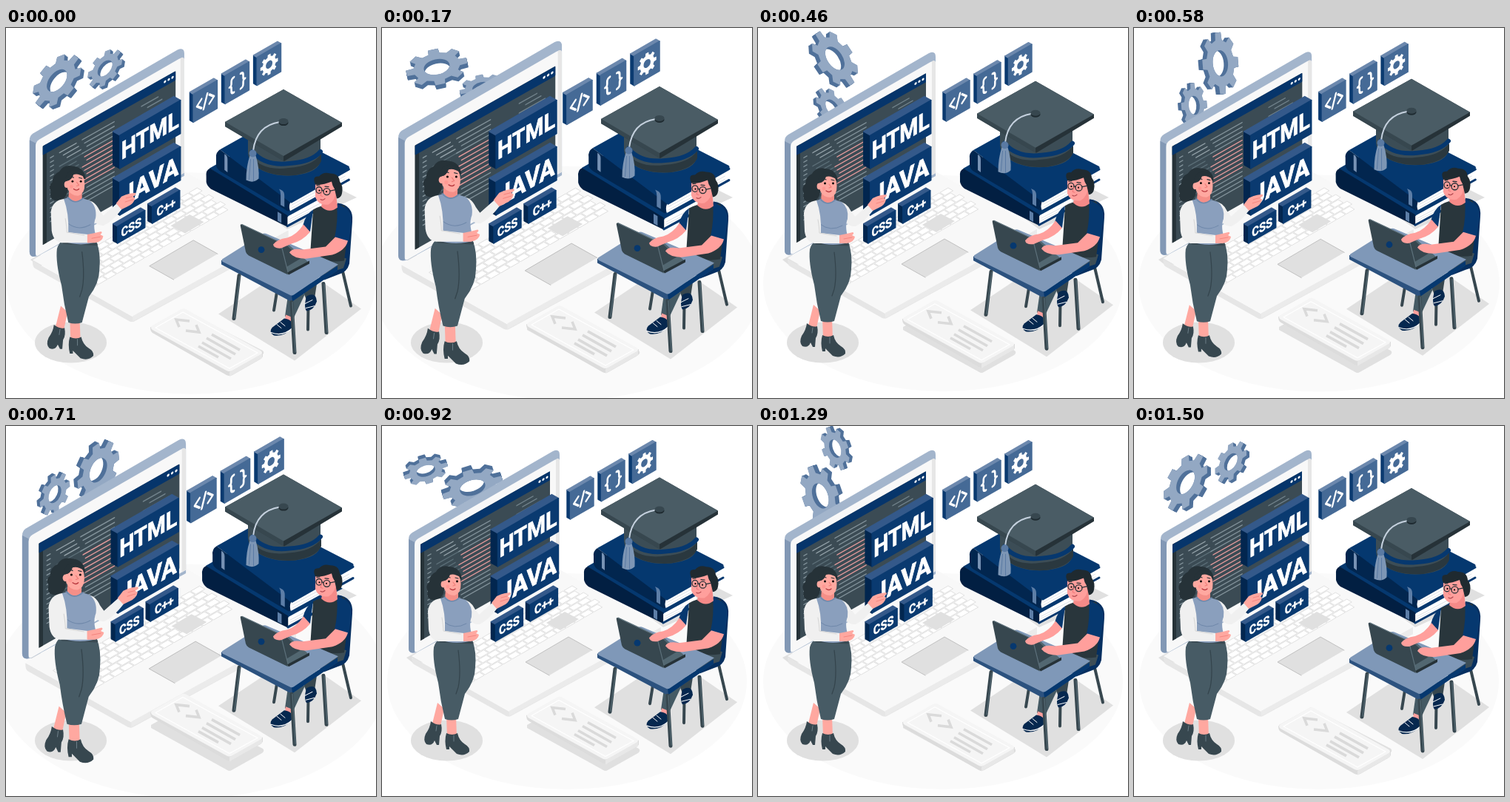
These frames come from a looping animation (500 by 500 pixels, 1.54 s). An HTML page:

```html
<!DOCTYPE html>
<html lang="en">
<head>
<meta charset="utf-8">
<title>Learning to code</title>
<style>
html, body { margin: 0; width: 100%; height: 100%; overflow: hidden; background: #fff; }
svg { display: block; width: 100vw; height: 100vh; }
text { font-family: Roboto, Inter, sans-serif; font-weight: 700; fill: #fff; text-anchor: middle; }
.line { fill: none; stroke-linecap: round; stroke-linejoin: round; }
</style>
</head>
<body>
<svg viewBox="0 0 500 500" xmlns="http://www.w3.org/2000/svg">
  <ellipse id="ground" cx="250" cy="345" rx="243" ry="146" fill="#fafafa"/>
  <g fill="#e0e0e0">
    <ellipse cx="87.5" cy="425" rx="48.5" ry="27.5"/>
    <path d="M196 404L239 380 347 436Q350 439 346 442L305 465Q302 467 299 465L196 408Z"/>
    <path d="M380 272L474 229 440 212 350 250Z"/>
    <path d="M33 313L46 306 60 318 44 322Z"/>
  </g>
  <g id="gears"></g>

  <g id="laptop">
    <path d="M40 312L172 386 377 272V281L174 392Q172 393 168 392L43 322Q40 320 40 313Z" fill="#e6e6e6"/>
    <path d="M40 311L240 194 377 272 174 384Q172 385 169 384Z" fill="#f8f8f8"/>
    <path d="M172 385V392L377 281V272Z" fill="#ebebeb"/>
    <g id="keys" fill="#fff" stroke="#dedede" stroke-width=".9"></g>
    <path d="M222 266L247 251 266 261 241 276Z" fill="#e0e0e0"/>
    <path d="M252 285L194 319 226 337 284 303Z" fill="#e0e0e0"/>
    <path d="M226 337L194 319 252 285 284 303" class="line" stroke="#bdbdbd" stroke-width=".9"/>
    <path d="M36 153Q36 147 41 144L231 34Q240 30 240 39V200L47 306Q36 309 36 300Z" fill="#a3b5cc"/>
    <path d="M36 153L44 157V306Q36 308 36 300Z" fill="#8298b5"/>
    <path d="M44 161Q44 155 49 152L233 46Q240 42 240 48V196L48 305Q44 307 44 302Z" fill="#f8f8f8"/>
    <path d="M235 45Q240 42 240 48V196L235 199Z" fill="#e6e6e6"/>
  </g>
  <g id="screen">
    <g transform="matrix(1 -.565 0 1 52 160)">
      <rect width="175" height="130" fill="#3b4b54"/>
      <rect width="5" height="130" fill="#263238"/>
      <rect width="175" height="12" rx="1" fill="#06356b"/>
      <g id="code" class="line" stroke-width="1.5"></g>
      <g fill="#fff"><circle cx="161" cy="6" r="1.6"/><circle cx="166" cy="6" r="1.6"/><circle cx="171" cy="6" r="1.6"/></g>
    </g>
  </g>

  <g id="tiles"></g>
  <g id="icons"></g>

  <g id="books">
    <path d="M277 190L340 154 448 218 380 254Z" fill="#05386f"/>
    <path d="M278 190Q272 192 273 201V208Q274 213 279 217L380 267V252Z" fill="#021f42"/>
    <path d="M381 253L425 229V242L381 264Z" fill="#fff"/>
    <path d="M383 257L425 235M383 260L425 239" class="line" stroke="#d5dbe2" stroke-width=".8"/>
    <path d="M380 266L428 240" class="line" stroke="#05386f" stroke-width="3"/>
    <path d="M367 247L372 250V262L367 259Z" fill="#5d7ea7"/>
    <path d="M291 165L352 131 461 187Q463 190 459 192L384 235Z" fill="#05386f"/>
    <path d="M291 165Q285 169 286 176V186Q287 191 292 194L380 246Q385 248 384 235Z" fill="#02264f"/>
    <path d="M384 234L459 193Q455 201 460 206L384 247Q381 241 384 234Z" fill="#fff"/>
    <path d="M386 238L456 200M386 242L456 204" class="line" stroke="#d5dbe2" stroke-width=".8"/>
    <path d="M383 248L461 205M385 234L461 191" class="line" stroke="#05386f" stroke-width="3"/>
    <path d="M297 171Q301 173 301 178V195L297 192Z" fill="#7892b4"/>
    <path d="M369 217L373 219Q376 221 376 226V241L371 238V224Q371 220 369 217Z" fill="#5d7ea7"/>
  </g>

  <g id="hat">
    <path d="M327 138H425V180Q423 196 391 200Q356 203 336 187Q328 181 327 170Z" fill="#3c4d56"/>
    <path d="M330 172Q345 195 382 190Q414 188 426 171V181Q420 195 391 200Q350 203 330 181Z" fill="#2a383f"/>
    <path d="M333 168Q350 188 383 184Q413 182 425 168" class="line" stroke="#06386f" stroke-width="6"/>
    <path d="M296 128L375 84 454 129V134L376 181 296 134Z" fill="#263238"/>
    <path d="M296 128L375 173V181L296 134Z" fill="#37474f"/>
    <path d="M375 84L454 129 375 174 296 128Z" fill="#4a5c65"/>
    <path d="M370 128Q338 133 334 167" class="line" stroke="#c5d1de" stroke-width="2"/>
    <ellipse cx="375" cy="129" rx="6.5" ry="4" fill="#1f2b31"/>
    <ellipse cx="375" cy="127" rx="6.5" ry="4" fill="#37474f"/>
    <g transform="translate(-.5 2.5)">
      <path d="M330 171L338 171Q343 187 342 202Q335 209 325 204Q325 186 330 171Z" fill="#7d96b5"/>
      <path d="M331 176L329 203M335 176V205" class="line" stroke="#5a7aa3" stroke-width="1"/>
      <circle cx="334" cy="168" r="5" fill="#5a7aa3"/>
    </g>
  </g>

  <g id="sign">
    <path d="M195 405L302 459 347 439V445Q346 447 343 449L306 470Q302 472 298 470L198 413Q195 411 195 405Z" fill="#dcdcdc"/>
    <path d="M198 403L235 382Q239 379 243 381L344 437Q348 440 344 443L306 464Q302 466 298 464L198 409Q194 406 198 403Z" fill="#f5f5f5"/>
    <path d="M302 466V472L346 447V441Z" fill="#e8e8e8"/>
    <path d="M202 406L239 385 340 440 302 461Z" class="line" stroke="#fff" stroke-width="1.2"/>
    <g class="line" stroke="#dadada" stroke-width="3.6" style="stroke-linecap:butt;stroke-linejoin:miter">
      <path d="M248 397L230 395 234 405M243 410L261 412 257 402"/>
      <path d="M278 415L316 436M271 420L310 442M265 426L304 448M260 431L287 446"/>
    </g>
  </g>

  <g id="student">
    <path d="M287 387L390 450 480 380 400 325 350 345Z" fill="#e0e0e0"/>
    <g class="line" stroke="#37474f" stroke-width="4">
      <path d="M368 345L362 382M409 345L408 408M454 325L466 376"/>
    </g>
    <path d="M401 355L420 346 417 366 406 368Z" fill="#37474f"/>
    <path d="M406 363Q419 356 420 370Q416 382 406 383Q402 378 406 363Z" fill="#06284f"/>
    <path d="M404 373L414 368M405 379L417 376" class="line" stroke="#fff" stroke-width="1"/>
    <path d="M382 355L404 360 388 394 377 390Z" fill="#455a64"/>
    <path d="M378 388L388 392 386 398 377 395Z" fill="#ff9f9c"/>
    <path d="M376 393Q388 394 387 405Q377 418 362 416Q354 411 360 405Z" fill="#06284f"/>
    <path d="M358 412Q374 418 387 406" class="line" stroke="#fff" stroke-width="1.2"/>
    <path d="M366 401L372 406M371 398L377 403" class="line" stroke="#fff" stroke-width="1"/>
    <path d="M448 237Q470 240 468 262L464 319Q461 331 448 334L430 341 415 330Z" fill="#052f60"/>
    <path d="M405 318L440 306 460 312 456 325 425 335Z" fill="#3d4e57"/>
    <path d="M415 246Q427 239 440 241L457 240Q464 254 461 285L457 315Q433 319 411 308Z" fill="#29363c"/>
    <path d="M415 246Q405 252 401 268L411 276Z" fill="#06386f"/>
    <path d="M447 239Q467 243 467 262L463 289Q452 291 444 284Q449 262 447 239Z" fill="#06386f"/>
    <path d="M291 314L386 362 448 322V328L388 369Q386 370 383 369L291 320Z" fill="#2c527f"/>
    <path d="M386 362L448 322V328L387 370Z" fill="#06386f"/>
    <path d="M292 313L346 279Q349 277 353 279L449 320 389 361Q386 363 383 361L292 316Z" fill="#7f98b8"/>
    <g class="line" stroke="#37474f">
      <path d="M315 335L308 393M386 371L390 439M429 346L433 412" stroke-width="5"/>
      <path d="M316 336L309 392M387 371L391 438M430 347L434 411" stroke="#536872" stroke-width="1.3"/>
    </g>
    <path d="M349 302L377 289 410 318 380 334Z" fill="#526771"/>
    <path d="M354 302L377 292 398 312 378 324Z" fill="#37474f"/>
    <path d="M380 331L410 315V319L382 334Z" fill="#263238"/>
    <path d="M319 266L368 289Q371 290 372 294L381 330Q381 334 377 332L328 308Q325 306 324 303L317 269Q316 265 319 266Z" fill="#37474f"/>
    <path d="M319 266L368 289Q371 290 372 294L381 330" class="line" stroke="#5d717b" stroke-width="1.2"/>
    <circle cx="345" cy="300" r="4.4" fill="#06386f"/>
    <g fill="#ff9f9c">
      <path d="M402 266L411 276Q401 288 386 292L372 298Q362 299 361 293Q366 286 380 284Q393 280 402 266Z"/>
      <path d="M445 283L462 288Q459 301 441 307L407 312Q390 313 383 304Q386 297 401 300L432 296Z"/>
      <path d="M429 230L446 224 448 243Q437 252 426 242Z" fill="#f58a88"/>
      <path d="M418 212Q418 205 430 205Q446 205 446 219Q446 233 436 239Q422 241 418 229Z"/>
      <ellipse cx="446" cy="221" rx="3.6" ry="5"/>
    </g>
    <path d="M418 212Q413 200 423 201Q429 194 438 197Q450 197 451 208Q456 214 454 224Q453 230 447 231L444 218Q441 214 440 208Q428 213 418 212Z" fill="#1f2a30"/>
    <g class="line" stroke="#263238" stroke-width="1.3">
      <ellipse cx="423" cy="219.500" rx="4" ry="4.3"/><ellipse cx="433.500" cy="221.500" rx="4.5" ry="4.5"/>
      <path d="M427 219.500L429 220.500M438 220.500L445 219M420 213L424 212.500M431 214.500L436 215"/>
      <path d="M425 232Q428 234 431 231" stroke="#b34a51" stroke-width="1.2"/>
      <path d="M427 221L425 227 428 228" stroke="#ee7778" stroke-width="1"/>
    </g>
    <circle cx="423.500" cy="220" r="1.1"/><circle cx="433" cy="221.500" r="1.1"/>
  </g>

  <g id="teacher">
    <g fill="#ffa8a0">
      <path d="M75 374L84 382 79 406H67Z"/><path d="M87 392H100L101 420H88Z"/>
    </g>
    <path d="M66 399Q74 405 80 403Q82 413 78 419L77 431H74L71 425Q68 433 60 430Q55 425 59 416Q65 408 66 399Z" fill="#37474f"/>
    <path d="M87 415Q95 419 102 415Q104 425 112 430Q119 434 118 440Q111 447 101 443L91 433V437H87Q84 425 87 415Z" fill="#37474f"/>
    <path d="M74 405L73 412M97 418L97 426" class="line" stroke="#6b7d86" stroke-width="1"/>
    <path d="M79 287L122 289Q128 305 126 326Q126 344 112 362L103 396Q94 399 85 396Q79 372 76 347Q68 317 70 299Q72 291 79 287Z" fill="#475b65"/>
    <path d="M103 303Q107 335 103 353L100 362" class="line" stroke="#34444c" stroke-width="1.2"/>
    <path d="M79 291L122 293" class="line" stroke="#3a4a53" stroke-width="3"/>
    <path d="M73 197Q79 187 91 190Q106 191 108 207Q100 204 88 207L84 222Q82 234 72 235Q59 236 62 223Q58 216 64 211Q64 201 73 197Z" fill="#263238"/>
    <path d="M86 219L103 225 103 238Q94 242 85 235Z" fill="#f58f88"/>
    <path d="M83 206Q88 197 97 198Q106 200 106.500 213Q107 226 98 229Q88 229 84 220Z" fill="#ffa8a0"/>
    <ellipse cx="83" cy="214" rx="3.4" ry="4.4" fill="#ffa8a0"/>
    <path d="M81 209Q82 195 94 195Q104 196 107 205Q98 199 92 201Q88 211 81 209Z" fill="#263238"/>
    <g class="line" stroke="#263238" stroke-width="1.1">
      <path d="M87 206Q90 203 92 205M99 205L103 206"/>
      <path d="M96 211L99 215 96 216" stroke="#ef7d78"/>
      <path d="M92 220Q96 223 99 220" stroke="#b9393f" stroke-width="1.3"/>
    </g>
    <circle cx="90.500" cy="210" r="1.4"/><circle cx="101.500" cy="210" r="1.4"/>
    <circle cx="89" cy="217" r="2.4" fill="#ff8f8a" opacity=".6"/>
    <path d="M109 235Q120 235 126 248L131 255 149 239 156 246Q144 262 132 268Q123 269 116 260Z" fill="#f0f0f0"/>
    <path d="M148 239L155 230Q161 227 166 226L173 225Q176 227 170 230L173 232Q171 240 163 243L155 247Z" fill="#ffa8a0"/>
    <path d="M160 237L170 234M161 232L169 230" class="line" stroke="#f2837d" stroke-width=".9"/>
    <path d="M79 233L86 231Q94 241 103 232L113 235Q123 243 121 258Q116 270 124 289Q102 297 78 289Z" fill="#8a9fbd"/>
    <path d="M84 231Q93 242 105 232" class="line" stroke="#6f88aa" stroke-width="1.6"/>
    <path d="M84 265Q98 276 114 267" class="line" stroke="#6f88aa" stroke-width="1"/>
    <path d="M79 233Q64 235 62 250L63 275Q65 289 76 291L111 291V280L85 277Q86 252 79 233Z" fill="#f0f0f0"/>
    <path d="M81 259Q83 270 83 277L106 281" class="line" stroke="#d5d5d5" stroke-width="1"/>
    <path d="M110 280L120 278 128 276Q131 277 127 280L131 282Q130 289 120 291L110 291Z" fill="#ffa8a0"/>
    <path d="M116 285L127 283" class="line" stroke="#f2837d" stroke-width=".9"/>
  </g>
</svg>

<script>
const LOOP = 1540, FRAMES = 37;
const SLOPE = 0.577;
const $ = id => document.getElementById(id);
const poly = (pts, fill) =>
  `<polygon points="${pts.join(' ')}" fill="${fill}" stroke="${fill}" stroke-width="1.4" stroke-linejoin="round"/>`;
const iso = (x, y, body) => `<g transform="matrix(.866 -.5 0 1 ${x} ${y})">${body}</g>`;

// Upright slab; x, y is the top left corner of its front face.
function slab(x, y, w, h, d, front, side, top) {
  const k = w * SLOPE, e = d * SLOPE;
  return poly([x, y, x - d, y - e, x - d, y - e + h, x, y + h], side) +
    poly([x, y, x - d, y - e, x + w - d, y - k - e, x + w, y - k], top) +
    poly([x, y, x + w, y - k, x + w, y - k + h, x, y + h], front);
}

function gearPath(r, hole, teeth = 8) {
  const step = 2 * Math.PI / teeth, pts = [];
  for (let i = 0; i < teeth; i++) {
    for (const [a, q] of [[-.3, .76], [-.2, 1], [.2, 1], [.3, .76]]) {
      const t = (i + a) * step;
      pts.push((r * q * Math.cos(t)).toFixed(2) + ' ' + (r * q * Math.sin(t)).toFixed(2));
    }
  }
  return `M${pts.join('L')}ZM${hole} 0A${hole} ${hole} 0 1 0 ${-hole} 0A${hole} ${hole} 0 1 0 ${hole} 0Z`;
}
const gear = (r, hole, fill) => `<path d="${gearPath(r, hole)}" fill="${fill}" fill-rule="evenodd"/>`;

function thickGear(x, y, r, hole, depth) {
  let out = '';
  for (let i = depth; i > 0; i -= .7) out += iso(x + i, y + i * SLOPE, gear(r, hole, '#50719a'));
  return out + iso(x, y, gear(r, hole, '#93a8c3'));
}

function keyboard() {
  const cols = 15, rows = 6, at = (c, r) => {
    const a = c / cols, b = r / rows;
    return [257 - 184 * a + 46 * b, 216 + 106 * a + 27 * b];
  };
  let out = '';
  for (let r = 0; r < rows; r++) for (let c = 0; c < cols; c++) {
    const a = c + (r % 2) * .35, b = Math.min(cols, a + .9);
    out += `<polygon points="${[at(a, r), at(b, r), at(b, r + .86), at(a, r + .86)].join(' ')}"/>`;
  }
  return out;
}

function codeLines() {
  const row = (x1, x2, y, c) => `<path d="M${x1} ${y}H${x2}" stroke="${c}"/>`;
  let out = '';
  for (let i = 0; i < 15; i++) {
    const y = 21 + i * 6, pink = i > 3 && i < 11;
    out += row(10, 14, y, '#82929a');
    out += row(22 + (i * 7 % 3) * 5, 44 + (i * 5 % 4) * 3, y, i < 3 ? '#93a1a8' : '#5c6f78');
    out += row(52 + (i % 3) * 3, 94, y, pink ? '#e59a9b' : '#82929a');
    if (i < 5) out += row(130 + (i % 2) * 8, 152 + (i % 3) * 5, y, '#71828b');
  }
  return out;
}

const label = (x, y, size, s) =>
  iso(x, y, `<text font-size="${size}" stroke="#fff" stroke-width="${size / 40}">${s}</text>`);
const wordTile = (x, y, w, h, d, size, s) =>
  slab(x, y, w, h, d, '#0a3a70', '#02264f', '#34598a') +
  label(x + w / 2, y - w * SLOPE / 2 + h / 2 + size * .36, size, s);

$('gears').innerHTML = thickGear(69.5, 75.5, 34.5, 14.5, 5) + thickGear(131, 49, 25, 10.5, 4);
$('keys').innerHTML = keyboard();
$('code').innerHTML = codeLines();
$('tiles').innerHTML =
  wordTile(154, 145, 82, 45, 9, 33, 'HTML') +
  wordTile(154, 208, 82, 45, 9, 36, 'JAVA') +
  wordTile(151, 268, 37, 23, 6, 17, 'CSS') +
  wordTile(198, 241, 37, 23, 6, 17, 'C++');

const stroke = d => `<path d="${d}" class="line" stroke="#fff" stroke-width="2.9"/>`;
const glyphs = [
  stroke('M-6-6L-13 0-6 6M6-6L13 0 6 6M3-9L-3 9'),
  stroke('M-5-10Q-9-10-9-6V-3Q-9 0-12 0Q-9 0-9 3V6Q-9 10-5 10M5-10Q9-10 9-6V-3Q9 0 12 0Q9 0 9 3V6Q9 10 5 10'),
  gear(13.5, 5, '#fff')
];
$('icons').innerHTML = glyphs.map((g, i) => {
  const x = 254.5 + i * 42, y = 89 - i * 24.3;
  return slab(x, y, 31.5, 37, 4.5, '#456a96', '#0a3a70', '#6c88ad') + iso(x + 16, y + 9.5, g);
}).join('');

// Piecewise linear value of [position, value] stops.
function ramp(stops, u) {
  const i = Math.max(1, stops.findIndex(s => s[0] >= u));
  const [a, p] = stops[i - 1], [b, q] = stops[i];
  return p + (q - p) * (u - a) / (b - a);
}
const BEAT = [[0, 1], [.1, 1.1], [.3, 1], [.4, 1], [.5, 1.1], [.6, 1], [1, 1]];
const SHAKE = [[0, 0], [.1, -1], [.2, 2], [.3, -4], [.4, 4], [.5, -4], [.6, 4], [.7, -4], [.8, 2], [.9, -1], [1, 0]];
const PULSING = {
  ground: [250, 345], laptop: [203, 213], screen: [140, 175],
  icons: [310, 73], books: [367, 198], teacher: [115, 317]
};
const FLOATING = { hat: 19, sign: 19, student: 9 };

const move = (id, value) => $(id).setAttribute('transform', value);

function draw(ms) {
  const u = (Math.floor(ms % LOOP / LOOP * FRAMES + .06) / FRAMES + .025) % 1;
  const s = ramp(BEAT, u);
  for (const [id, [x, y]] of Object.entries(PULSING))
    move(id, `translate(${x} ${y}) scale(${s}) translate(${-x} ${-y})`);
  const lift = 1 - Math.abs(1 - 2 * u);
  for (const [id, h] of Object.entries(FLOATING)) move(id, `translate(0 ${-h * lift})`);
  move('tiles', `translate(${ramp(SHAKE, u)} 0)`);
  move('gears', `rotate(${360 * u} 97.5 69)`);
}

const start = performance.now();
function tick() {
  draw(performance.now() - start);
  requestAnimationFrame(tick);
}
draw(0);
requestAnimationFrame(tick);
</script>
</body>
</html>
```
